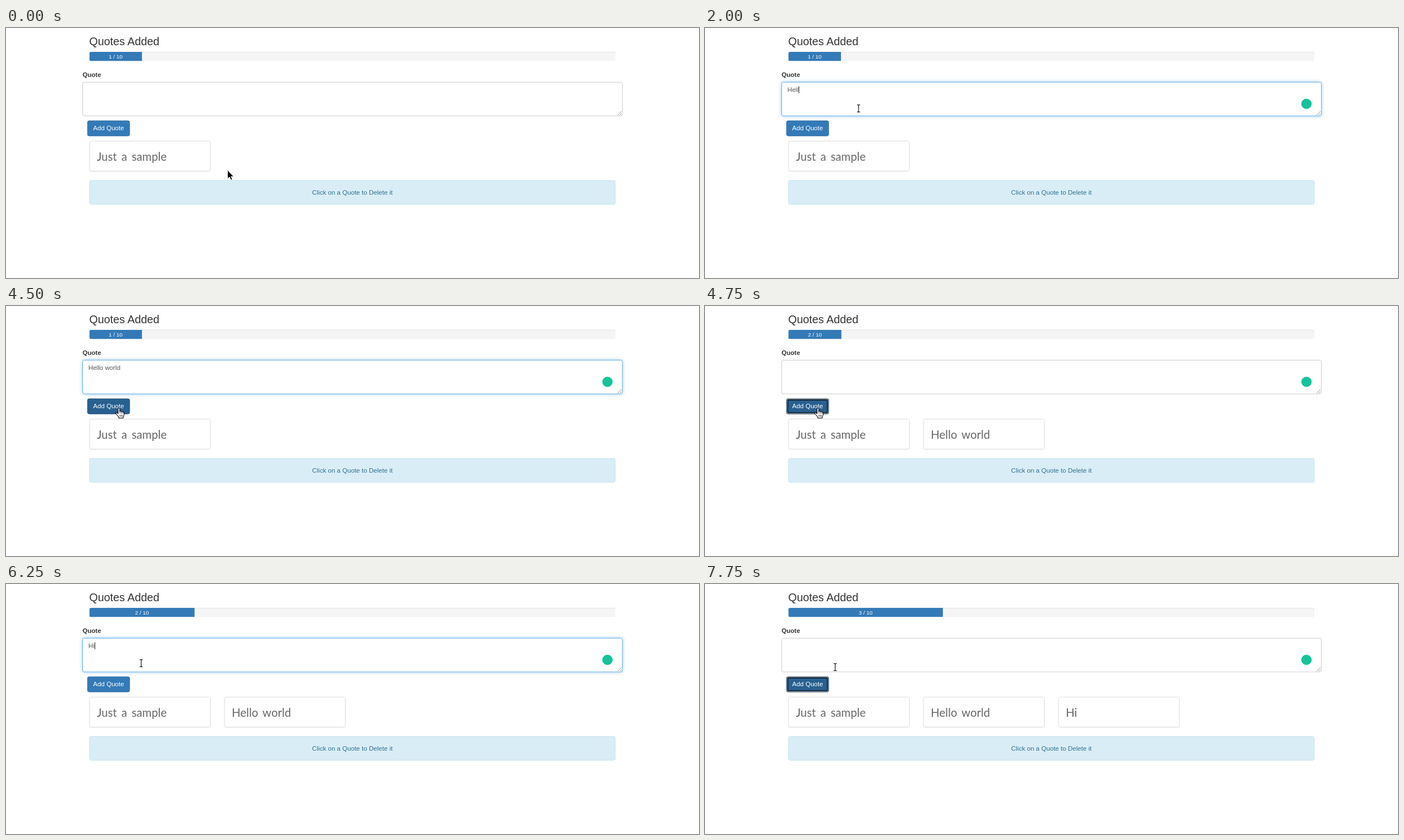
An HTML page that plays this animation: 1243x450 px, repeating every 8000 ms.

```html
<!DOCTYPE html>
<html lang="en">
<head>
<meta charset="utf-8">
<title>Quotes</title>
<style>
html, body { margin: 0; width: 100%; height: 100%; overflow: hidden; background: #fff; }
svg { display: block; width: 1243px; height: 450px; }
text { font: 11.6px "Liberation Sans", Arial, sans-serif; fill: #333; white-space: pre; }
.mid { text-anchor: middle; }
#heading { font-size: 19.86px; }
#label { font-weight: bold; }
#count { font-size: 9.93px; fill: #fff; }
#typed { fill: #555; }
#area { fill: #fff; stroke: #ccc; }
#area.focus { stroke: #66afe9; filter: drop-shadow(0 0 3px rgba(102, 175, 233, .65)); }
#button { fill: #337ab7; stroke: #2e6da4; }
#button.hover { fill: #286090; stroke: #204d74; }
#button.pressed { fill: #286090; stroke: #122b40; }
.card rect { fill: #fff; stroke: #ddd; filter: drop-shadow(0 1px 1px rgba(0, 0, 0, .05)); }
.card text { font: 20.4px Lato, sans-serif; word-spacing: 3px; fill: #666; }
</style>
</head>
<body>
<svg viewBox="0 0 1243 450">
  <text id="heading" x="149.2" y="30.7">Quotes Added</text>
  <rect x="149.5" y="43" width="943.6" height="16.5" rx="3.3" fill="#f5f5f5"/>
  <path d="M150 46q0-2.7 3-2.7H1090q2.7 0 2.7 2.7" fill="none" stroke="#e4e4e4"/>
  <clipPath id="track"><rect x="149.5" y="43" width="943.6" height="16.5" rx="3.3"/></clipPath>
  <rect id="bar" x="149.5" y="43" height="16.5" fill="#337ab7" clip-path="url(#track)"/>
  <text id="count" class="mid" y="54.6"></text>

  <text id="label" x="137.2" y="88.3">Quote</text>
  <rect id="area" x="137.5" y="97.5" width="968" height="60.7" rx="3"/>
  <path d="M1097 157l7-7M1101 157l3-3" stroke="#777" stroke-width=".8"/>
  <text id="typed" x="147.8" y="115"></text>
  <rect id="caret" y="105" width="1" height="12.5" fill="#222"/>
  <circle id="badge" cx="1078.8" cy="136.5" r="9.3" fill="#15c39a"/>

  <rect id="button" x="146.2" y="167" width="75.6" height="27.2" rx="3"/>
  <g id="ring" fill="none">
    <rect x="147.2" y="168" width="73.6" height="25.2" rx="2.5" stroke="#dfe6ec" stroke-width=".9"/>
    <rect x="148.4" y="169.2" width="71.2" height="22.8" rx="2" stroke="#101418" stroke-width="1.7"/>
  </g>
  <text class="mid" x="184" y="184.3" style="fill:#fff">Add Quote</text>

  <g id="cards"></g>

  <rect x="149.8" y="274.5" width="943" height="42.7" rx="3" fill="#d9edf7" stroke="#c3e4ee"/>
  <text class="mid" x="621.3" y="299.6" style="fill:#31708f">Click on a Quote to Delete it</text>

  <g id="arrow"><path d="M0 0V15.2L3.5 12 6 17.5 8.4 16.4 6 11.2H10.6Z" fill="#000" stroke="#fff" stroke-width=".7"/></g>
  <g id="beam"><path d="M-2.7-6.4H-.8L0-5.8 .8-6.4H2.7M0-5.8V5.8M-2.7 6.4H-.8L0 5.8 .8 6.4H2.7" fill="none" stroke="#111" stroke-width="1.2"/></g>
  <g id="hand"><path d="M-1.5 1.2Q0-.8 1.5 1.2V6.3Q3.2 5 4.1 6.8 5.9 5.7 6.7 7.5 9 6.8 9.2 9V12.5Q9 15 7.7 16.4V18.5H-.2V16.7L-5.5 10.2Q-6 7.6-3.5 8.6L-1.5 10.6Z" fill="#fff" stroke="#000" stroke-width="1.1" stroke-linejoin="round"/><path d="M1.5 6V10M4.1 7V10.3M6.7 8V10.5M1.7 12.5V16M3.9 12.5V16M6.1 12.5V16" stroke="#000" stroke-width=".8"/></g>
</svg>
<script>
const LOOP = 8000, TICK = 250, LEFT = 149.5, UNIT = 94.36;
const clicks = [4740, 7335];
const quotes = ['Just a sample', 'Hello world', 'Hi'];

// Step tables: [time, ...values], each holding until the next row
const pointer = [
  [0, 'arrow', 397.5, 256], [250, 'arrow', 352, 219], [500, 'beam', 286, 150], [750, 'beam', 275.5, 144.7],
  [4250, 'beam', 240, 151], [4500, 'hand', 202.5, 183.3], [5000, 'hand', 209, 179], [5250, 'beam', 242.5, 142.5],
  [6750, 'beam', 231, 152], [7000, 'hand', 206, 181], [7250, 'hand', 203, 183], [7750, 'beam', 233.5, 149.5]
];
const typing = [
  [0, ''], [1250, 'H'], [1500, 'He'], [1750, 'Hel'], [2000, 'Hell'], [2250, 'Hello '],
  [2750, 'Hello wo'], [3000, 'Hello wor'], [3500, 'Hello worl'], [3750, 'Hello world'],
  [4750, ''], [6000, 'H'], [6250, 'Hi'], [7500, '']
];
const focus = [[0, false], [750, true], [4750, false], [5500, true], [7250, false]];
const caretOn = [[0, false], [750, true], [4500, false], [5500, true], [7000, false]];
const buttonState = [[0, ''], [4500, 'hover'], [4750, 'pressed'], [5500, ''], [7000, 'hover'], [7250, 'pressed']];

const $ = id => document.getElementById(id);
const at = (table, t) => table.findLast(row => row[0] <= t).slice(1);
const show = (el, on) => el.setAttribute('visibility', on ? 'visible' : 'hidden');

// CSS "ease", solved by bisection
function ease(x) {
  if (x <= 0 || x >= 1) return x <= 0 ? 0 : 1;
  const bezier = (a, b, s) => 3 * a * s * (1 - s) ** 2 + 3 * b * s * s * (1 - s) + s ** 3;
  let lo = 0, hi = 1;
  for (let i = 0; i < 24; i++) {
    const mid = (lo + hi) / 2;
    if (bezier(.25, .25, mid) < x) lo = mid; else hi = mid;
  }
  return bezier(.1, 1, lo);
}

$('cards').innerHTML = quotes.map((quote, i) =>
  `<g class="card" transform="translate(${i * 242.1})">
    <rect x="150" y="203.5" width="216.5" height="54" rx="3"/>
    <text x="163" y="238.5">${quote}</text></g>`).join('');
const cards = [...$('cards').children];

function draw(t) {
  const count = 1 + clicks.filter(c => c <= t).length;
  const width = UNIT * clicks.reduce((sum, c) => sum + ease((t - c) / 600), 1);
  $('bar').setAttribute('width', width);
  $('count').setAttribute('x', LEFT + width / 2);
  $('count').textContent = `${count} / 10`;
  cards.forEach((card, i) => show(card, i < count));

  const [text] = at(typing, t);
  $('typed').textContent = text;
  $('caret').setAttribute('x', Math.round(147.8 + (text ? $('typed').getComputedTextLength() : 0)));
  show($('caret'), at(caretOn, t)[0]);
  show($('badge'), t >= 1250);
  $('area').setAttribute('class', at(focus, t)[0] ? 'focus' : '');

  const [state] = at(buttonState, t);
  $('button').setAttribute('class', state);
  show($('ring'), state === 'pressed');

  const [kind, x, y] = at(pointer, t);
  for (const name of ['arrow', 'beam', 'hand']) show($(name), name === kind);
  $(kind).setAttribute('transform', `translate(${x} ${y})`);
}

const start = performance.now();
function tick() {
  const t = (performance.now() - start) % LOOP;
  draw(Math.floor(t / TICK) * TICK);
  requestAnimationFrame(tick);
}
tick();
</script>
</body>
</html>
```
